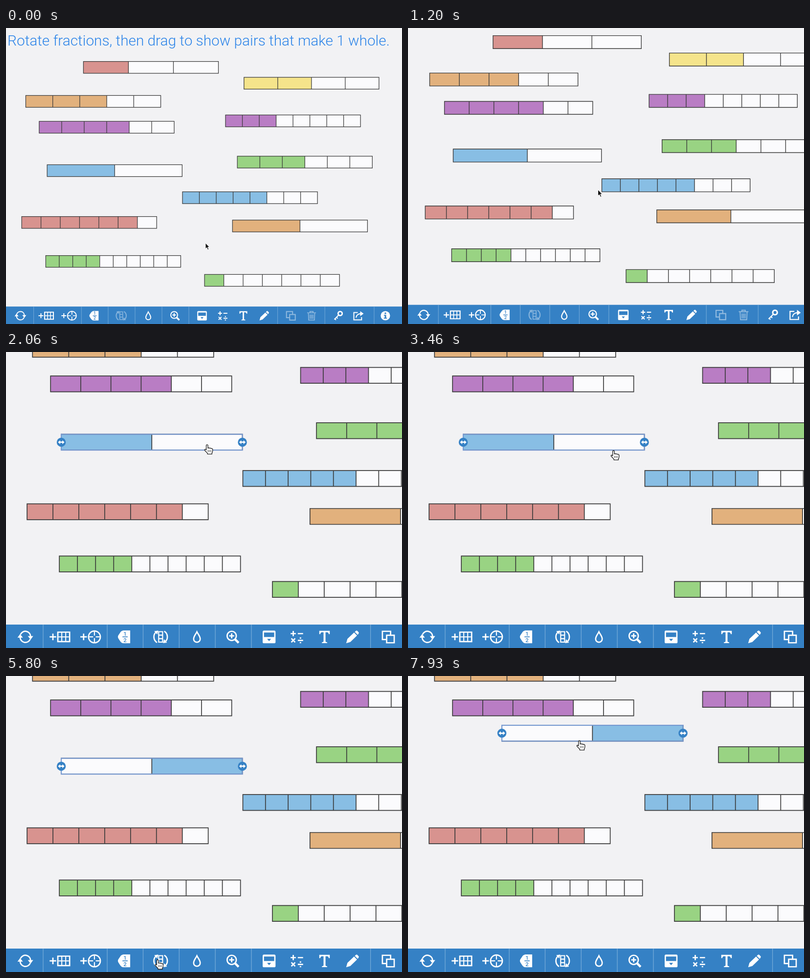
An HTML page that plays this animation: 810 px wide and 607 px high, repeating every 8 s.

```html
<!DOCTYPE html>
<html lang="en">
<head>
<meta charset="utf-8">
<title>Fraction bars</title>
<style>
  html, body { margin: 0; width: 100%; height: 100%; overflow: hidden; background: #f2f2f4; }
  svg { display: block; width: 100%; height: 100%; }
  .title { font: 300 29.8px Roboto, sans-serif; fill: #2c84e8; }
  .frame { fill: none; stroke: #3a3a3a; stroke-width: 1.25; }
  .picked { fill: none; stroke: #7799d0; stroke-width: 1.6; }
  .fill { fill: #fff; }
  .line { fill: none; stroke: #fff; stroke-width: 2; }
  .blue { fill: #3581c5; }
  .blueLine { fill: none; stroke: #3581c5; stroke-width: 1.2; }
  .digit { font: 500 8.5px Roboto, sans-serif; fill: #3581c5; text-anchor: middle; }
</style>
</head>
<body>
<svg viewBox="0 0 810 607">
  <defs>
    <g id="turn">
      <path class="line" stroke-width="2.6" d="M-7.4-3.6A8 8 0 0 1 8-.5"/>
      <path class="fill" d="M3.7-1.2H12L8 4.2Z"/>
    </g>
    <g id="bend">
      <path class="line" d="M-5.5 8.6C-11.5 5-11.8-4-6.5-7.6"/>
      <path class="fill" d="M-9.8-8.8L-3.6-9.6L-5.2-3.6Z"/>
    </g>
    <path id="plus" class="line" stroke-width="2.4" d="M-5 0H5M0-5V5"/>
    <g id="handle">
      <circle class="blue" r="6.9"/>
      <path class="fill" d="M-5 0L-1.6-3V-1H1.6V-3L5 0L1.6 3V1H-1.6V3Z"/>
    </g>
  </defs>
  <rect width="810" height="607" fill="#f2f2f4"/>
  <g id="world">
    <text class="title" x="3" y="36">Rotate fractions, then drag to show pairs that make 1 whole.</text>
    <g id="bars"></g>
    <rect class="blue" y="571.2" width="812" height="37"/>
    <path id="gaps" fill="none" stroke="#72a9d8"/>

    <g transform="translate(29.5 590)"><use href="#turn"/><use href="#turn" transform="rotate(180)"/></g>

    <use href="#plus" x="71.5" y="590"/>
    <g transform="translate(88 590)">
      <path class="line" d="M-9-7.2H9V7.2H-9Z"/>
      <path class="line" style="stroke-width:1.5" d="M-3-7V7M3-7V7M-8 0H8"/>
    </g>

    <use href="#plus" x="118.3" y="590"/>
    <g transform="translate(134.8 590)">
      <circle class="line" r="9"/>
      <path class="line" style="stroke-width:1.6" d="M-8 0H-2M2 0H8M0-8V-2M0 2V8"/>
    </g>

    <g transform="translate(180 590)">
      <path class="fill" d="M9.3-9.8V9.8H-1Q-4 9.6-6 6.5L-9 2Q-10 0-9-2L-6-6.5Q-4-9.6-1-9.8Z"/>
      <path class="blueLine" d="M-2.5 0H5.5"/>
      <text class="digit" x="1.5" y="-1.8">1</text>
      <text class="digit" x="1.5" y="8">2</text>
    </g>

    <g id="rotator" transform="translate(235.7 590)">
      <use href="#bend"/><use href="#bend" transform="rotate(180)"/>
      <path class="line" style="stroke-width:1.6" d="M-3-8H3V8H-3ZM-3-2.7H3M-3 2.7H3"/>
    </g>

    <path class="line" transform="translate(291 590)" d="M0-7.8C2-3.5 5-.8 5 3.2A5 5 0 0 1-5 3.2C-5-.8-2-3.5 0-7.8Z"/>

    <g transform="translate(344 588.5)">
      <circle class="line" r="7"/>
      <path class="line" d="M-3.8 0H3.8M0-3.8V3.8"/>
      <path class="line" style="stroke-width:3.4" d="M5.2 5.2L10.5 10.5"/>
    </g>

    <g transform="translate(401 590)">
      <rect class="fill" x="-9.8" y="-9.6" width="19.6" height="19.4" rx="2"/>
      <path class="blue" d="M-7.8-6.6H7.8V.2H-7.8ZM-3 3H3L0 6.6Z"/>
    </g>

    <path class="line" transform="translate(443.3 590)" d="M-9.5-5H-1.5M-5.5-9V-1M1.5-5H9.5M-8.4 2.4L-2.6 8.2M-2.6 2.4L-8.4 8.2M1.5 5.3H9.5M4.4 1.8H6.6M4.4 8.8H6.6"/>

    <path class="fill" transform="translate(485.5 590)" d="M-8-9.3H8V-4.3H6.4Q6-7 4-7H1.5V6.8Q1.5 8 4 8.2V9.5H-4V8.2Q-1.5 8-1.5 6.8V-7H-4Q-6-7-6.4-4.3H-8Z"/>

    <path class="fill" transform="translate(528 590)" d="M-9.5 9.8L-7.6 3L2.5-6.6L7-2L-3.2 7.8ZM3.6-7.6L5.6-9.4Q6.5-10 7.4-9.2L9.5-7Q10.2-6 9.4-5L8-3.2Z"/>

    <g id="copier" transform="translate(582.7 590)">
      <path class="line" d="M-3 4H-9V-8.5H3.5V-3M-2.5-2.5H9V9H-2.5Z"/>
    </g>

    <g opacity=".45" transform="translate(625 590)">
      <path class="line" style="stroke-width:1.7" d="M-6.5-5L-5.8 9H5.8L6.5-5M-9-6H9M-3.2-6V-8.7H3.2V-6M-2.8-2.5V6.5M0-2.5V6.5M2.8-2.5V6.5"/>
    </g>

    <g transform="translate(680 589.5)">
      <circle class="line" cx="3.5" cy="-4" r="4.2" style="stroke-width:2.8"/>
      <path class="line" d="M.3-.8L-8.5 8.2M-7.6 6.4L-5 9.2M-4.2 3.4L-1.6 6.2"/>
    </g>

    <g transform="translate(720.5 590)">
      <path class="line" d="M-1-6.5H-9V8.6H6.8V3"/>
      <path class="line" d="M-4.5 4Q-3.5-3.5 5-4.2"/>
      <path class="fill" d="M4-9.3L11-4.2L4 1Z"/>
    </g>

    <g transform="translate(776 590)">
      <circle class="fill" r="9.6"/>
      <path class="blue" d="M-1.6-6.6H1.6V-3.6H-1.6ZM-3-1.8H1.6V4.2H3.2V6H-3.2V4.2H-1.4V0H-3Z"/>
    </g>

    <circle id="press" cx="237" cy="592.8" r="20.3" fill="#fff"/>
    <g id="cursor">
      <path id="arrow" d="M0 0V11.6L2.7 9.2L4.7 13.7L6.7 12.8L4.8 8.5H8.2Z" fill="#111" stroke="#fff" stroke-width=".9"/>
      <g id="hand" stroke="#222" stroke-linejoin="round">
        <path fill="#fff" d="M-1.3 8V1.2Q-1.3 0 0 0T1.3 1.2V5.2Q2.4 4.2 3.6 5.3Q4.8 4.5 5.9 5.8Q7.8 5 8.4 7V9.5Q8.2 11.5 7.4 12.5V14.3H.6V13Q-1 11.2-3.6 8.6Q-4.2 7-2.8 6.9Q-2 7-1.3 8Z"/>
        <path fill="none" stroke-width=".7" d="M1.5 11V8.2M3.6 11V8.2M5.7 11V8.2"/>
      </g>
    </g>
  </g>
</svg>
<script>
const $ = id => document.getElementById(id);
const W = 276.1, H = 24.2, ZOOM = 1.342, FLOOR = 607, FPS = 15, LOOP = 8000;
const RED = '#d8938f', YELLOW = '#f5e48b', ORANGE = '#e2b17d', PURPLE = '#b97dc4',
      BLUE = '#88bee4', GREEN = '#99d383';

// x, y, parts, shaded parts, colour
const BARS = [
  [158.4, 68.6, 3, 1, RED], [486.8, 101.1, 4, 2, YELLOW], [40.4, 138.4, 5, 3, ORANGE],
  [67.9, 191.3, 6, 4, PURPLE], [449, 178.3, 8, 3, PURPLE], [473.2, 262.8, 6, 3, GREEN],
  [361, 335.9, 8, 5, BLUE], [32.1, 386.7, 7, 6, RED], [463.3, 393.9, 2, 1, ORANGE],
  [81.3, 466.5, 10, 4, GREEN], [406.1, 505.4, 7, 1, GREEN]
];
const HALF = { x: 222.25, y: 292.5 };

function bar(x, y, parts, shaded, color) {
  const step = W / parts;
  let lines = `M${x} ${y}h${W}v${H}h${-W}z`;
  for (let i = 1; i < parts; i++) lines += `M${x + i * step} ${y}v${H}`;
  return `<rect x="${x}" y="${y}" width="${W}" height="${H}" fill="#fbfbfd"/>
    <rect x="${x}" y="${y}" width="${shaded * step}" height="${H}" fill="${color}"/>
    <path class="frame" d="${lines}"/>`;
}

$('bars').innerHTML = BARS.map(b => bar(...b)).join('') +
  `<g id="half">${bar(-W / 2, -H / 2, 2, 1, BLUE)}<g id="marks">
    <rect class="picked" x="${-W / 2}" y="${-H / 2}" width="${W}" height="${H}"/>
    <use href="#handle" x="${-W / 2}"/><use href="#handle" x="${W / 2}"/></g></g>`;
$('gaps').setAttribute('d', [56.6, 154.3, 209, 264, 319, 374, 555.6, 652.2, 753]
  .map(x => `M${x} 571.2V608`).join(''));

const clamp = u => Math.max(0, Math.min(1, u));
const smooth = u => u * u * (3 - 2 * u);
const cubic = u => u < .5 ? 4 * u ** 3 : 1 - 4 * (1 - u) ** 3;
const mix = (a, b, u) => a + (b - a) * u;
const mixPt = (p, q, u) => [mix(p[0], q[0], u), mix(p[1], q[1], u)];
const bezier = (a, b, c, d, u) => {
  const ab = mixPt(a, b, u), bc = mixPt(b, c, u), cd = mixPt(c, d, u);
  return mixPt(mixPt(ab, bc, u), mixPt(bc, cd, u), u);
};

const START = [408, 441], ON_BAR = [306.5, 296.4], BUTTON = [231, 588.4],
      BLANK = [252.6, 326.8], GRAB = [202.3, 304], DROP = [261.2, 253.6];
// Approach to the bar: tick and position
const APPROACH = [[13, ...START], [18, 353.7, 356.2], [22, 316.8, 308.7], [26, ...ON_BAR]];

function cursorAt(n) {
  if (n <= 13) return START;
  if (n < 26) {
    const i = APPROACH.findIndex(k => k[0] > n);
    const [a, ...p] = APPROACH[i - 1], [b, ...q] = APPROACH[i];
    return mixPt(p, q, (n - a) / (b - a));
  }
  if (n < 61) return bezier(ON_BAR, [395, 400.6], [193.7, 601.8], BUTTON, smooth(clamp((n - 51) / 10)));
  if (n < 107) return mixPt(BUTTON, BLANK, smooth(clamp((n - 94) / 6)));
  if (n < 111) return mixPt(BLANK, GRAB, smooth((n - 107) / 4));
  return mixPt(GRAB, DROP, smooth(clamp((n - 111) / 8)));
}

// Button flashes: first tick, opacity per tick
const FLASHES = [[66, [.45, .45, .22]], [79, [.45, .22]], [85, [.45, .22]]];

function render(ms) {
  const n = Math.min(119, Math.floor((ms + 7) * FPS / 1000));
  const zoom = n < 14 ? 1 : mix(1, ZOOM, cubic(clamp((n * 1000 / FPS - 793) / 979)));
  $('world').setAttribute('transform', `matrix(${zoom} 0 0 ${zoom} 0 ${FLOOR * (1 - zoom)})`);

  const [cx, cy] = cursorAt(n);
  const dragging = n > 111;
  const bx = HALF.x + (dragging ? cx - GRAB[0] : 0);
  const by = HALF.y + (dragging ? cy - GRAB[1] : 0);
  const angle = n < 67 ? 0 : n < 80 ? 90 : 180;
  $('half').setAttribute('transform', `translate(${bx} ${by}) rotate(${angle})`);

  const picked = n >= 31 && n < 104 || dragging;
  const flash = FLASHES.reduce((sum, [from, levels]) => sum + (levels[n - from] || 0), 0);
  $('marks').setAttribute('visibility', picked ? 'visible' : 'hidden');
  $('copier').setAttribute('opacity', picked ? 1 : .45);
  $('rotator').setAttribute('opacity', picked && flash < .4 ? 1 : .4);
  $('press').setAttribute('opacity', flash);

  const overBar = Math.abs(cx - bx) < W / 2 && Math.abs(cy - by) < H / 2 + 1;
  const pointing = n >= 27 && (overBar || cy > 571);
  $('cursor').setAttribute('transform', `translate(${cx} ${cy})`);
  $('arrow').setAttribute('visibility', pointing ? 'hidden' : 'visible');
  $('hand').setAttribute('visibility', pointing ? 'visible' : 'hidden');
}

function tick() {
  render(performance.now() % LOOP);
  requestAnimationFrame(tick);
}
tick();
</script>
</body>
</html>
```
